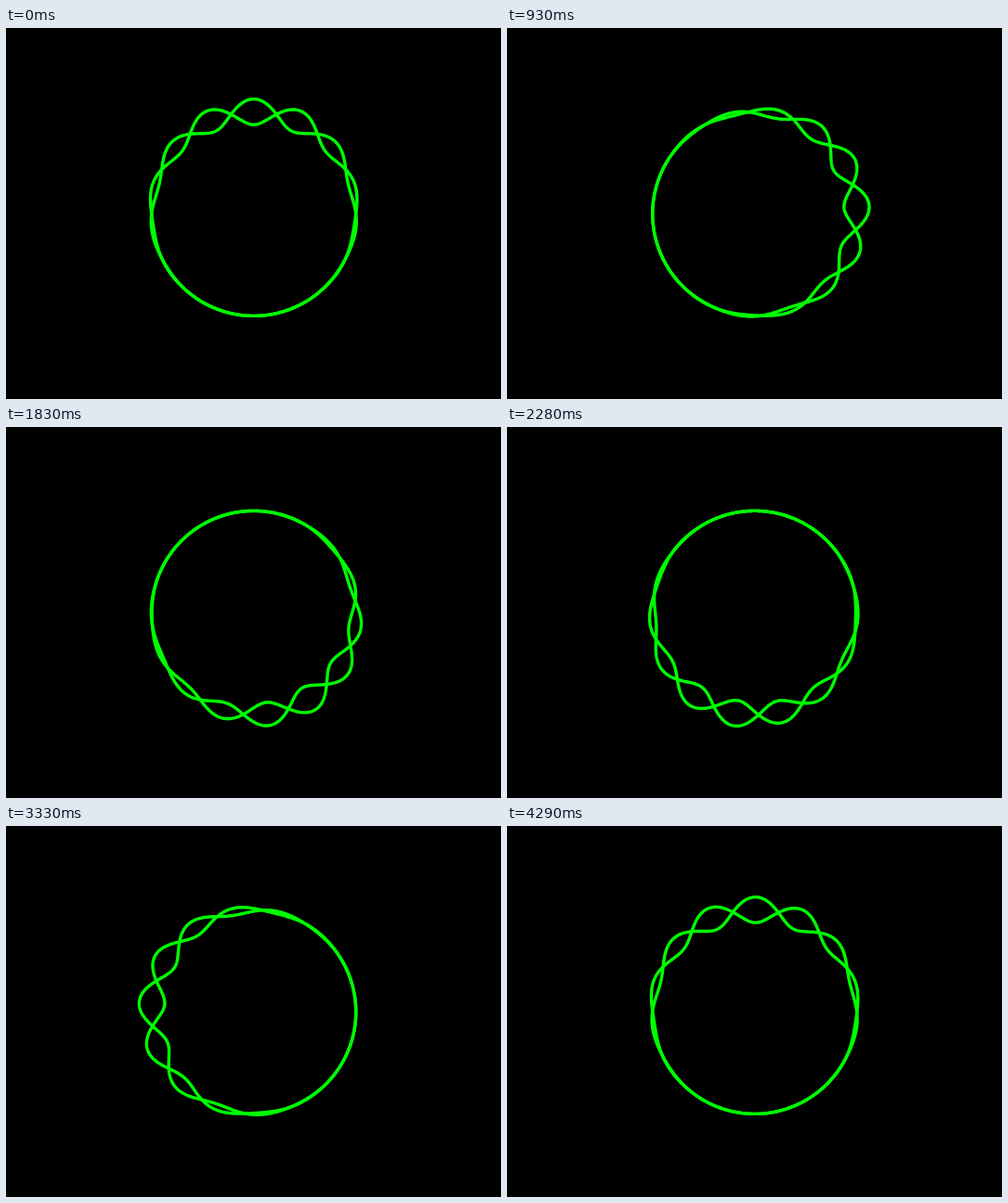
An HTML page with a canvas for the animation above (4.32 s loop, 533 px wide and 400 px high).

```html
<!DOCTYPE html>
<html lang="en">
<head>
<meta charset="utf-8">
<title>Wave packet on a ring</title>
<style>
html, body { margin: 0; width: 100%; height: 100%; overflow: hidden; background: #000; }
canvas { display: block; }
</style>
</head>
<body>
<canvas id="stage" width="533" height="400"></canvas>
<script>
const ctx = document.getElementById('stage').getContext('2d');
const TAU = 2 * Math.PI;
const LOOP = 4320, STEP = 30;
const CX = 266.75, CY = 200.4, RADIUS = 110, AMPLITUDE = 13.8, SPREAD = 0.8;
const SEGMENTS = 720;

// Angles run clockwise from the top; the packet is centred on phi
// while its ripples drift slowly the other way.
function wave(theta, phi) {
  const d = Math.abs(theta - phi);
  const gap = Math.min(d, TAU - d) / SPREAD;
  return AMPLITUDE * Math.exp(-gap * gap / 2) * Math.cos(7 * theta + 1.5 * phi);
}

function drawRing(phi, sign) {
  ctx.beginPath();
  for (let i = 0; i < SEGMENTS; i++) {
    const theta = i / SEGMENTS * TAU;
    const r = RADIUS + sign * wave(theta, phi);
    ctx.lineTo(CX + r * Math.sin(theta), CY - r * Math.cos(theta));
  }
  ctx.closePath();
  ctx.stroke();
}

function draw() {
  const t = performance.now() % LOOP;
  const phi = Math.floor(t / STEP) * STEP / LOOP * TAU;
  ctx.fillStyle = '#000';
  ctx.fillRect(0, 0, 533, 400);
  ctx.strokeStyle = '#0f0';
  ctx.lineWidth = 3.4;
  ctx.lineJoin = 'round';
  drawRing(phi, 1);
  drawRing(phi, -1);
  requestAnimationFrame(draw);
}
draw();
</script>
</body>
</html>
```
